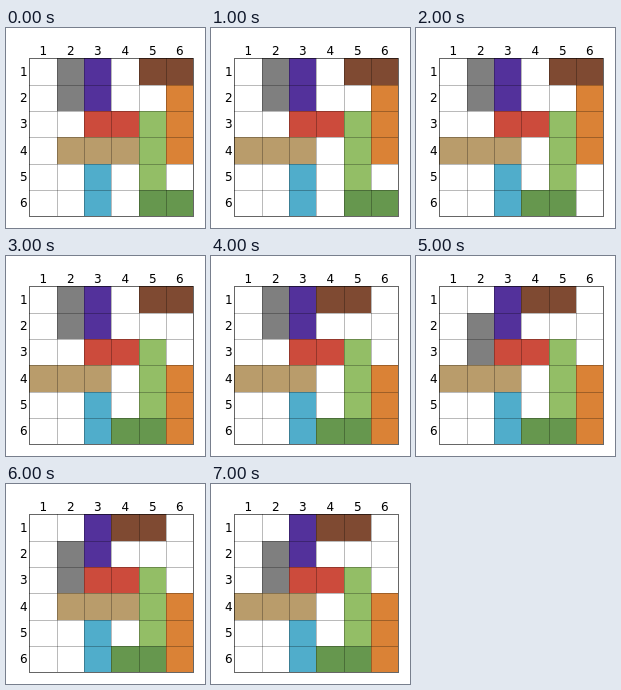
An HTML page with a canvas for the animation above (8 s loop, 199 by 200 pixels).

```html
<!DOCTYPE html>
<html>
<head>
<meta charset="utf-8">
<style>
html, body { margin: 0; width: 100%; height: 100%; overflow: hidden; background: #fff; }
canvas { display: block; }
</style>
</head>
<body>
<canvas id="board" width="199" height="200"></canvas>
<script>
const ctx = document.getElementById('board').getContext('2d');
const SIZE = 6, STEP_MS = 1000, LOOP_MS = 8000;
const xs = [23, 51, 78, 105, 133, 160, 187];
const ys = [30, 57, 83, 109, 136, 162, 188];

// color, column, row, width, height
const cars = {
  gray: ['#7f7f7f', 1, 0, 1, 2],
  purple: ['#53319b', 2, 0, 1, 2],
  brown: ['#7f4a32', 4, 0, 2, 1],
  red: ['#cc4b3c', 2, 2, 2, 1],
  orange: ['#da8236', 5, 1, 1, 3],
  lime: ['#93be66', 4, 2, 1, 3],
  tan: ['#b99c6b', 1, 3, 3, 1],
  blue: ['#50adcb', 2, 4, 1, 2],
  green: ['#66974e', 4, 5, 2, 1]
};

// one move per step: car, columns, rows
const moves = [
  ['tan', -1, 0], ['green', -1, 0], ['orange', 0, 2], ['brown', -1, 0],
  ['gray', 0, 1], ['tan', 1, 0], ['tan', -1, 0]
];

function drawCar(name, done) {
  let [color, col, row, w, h] = cars[name];
  for (const [car, dx, dy] of done) {
    if (car === name) { col += dx; row += dy; }
  }
  ctx.fillStyle = color;
  ctx.fillRect(xs[col], ys[row], xs[col + w] - xs[col], ys[row + h] - ys[row]);
}

function drawGrid() {
  const width = xs[SIZE] - xs[0], height = ys[SIZE] - ys[0];
  ctx.fillStyle = 'rgba(0, 0, 0, 0.27)';
  for (let i = 1; i < SIZE; i++) {
    ctx.fillRect(xs[i], ys[0], 1, height);
    ctx.fillRect(xs[0], ys[i], width, 1);
  }
  ctx.strokeStyle = 'rgba(0, 0, 0, 0.6)';
  ctx.strokeRect(xs[0] + 0.5, ys[0] + 0.5, width, height);
}

function drawLabels() {
  ctx.fillStyle = '#000';
  ctx.font = '12px "DejaVu Sans", sans-serif';
  ctx.textAlign = 'center';
  for (let i = 0; i < SIZE; i++) {
    ctx.fillText(i + 1, (xs[i] + xs[i + 1]) / 2 + 0.3, 27);
    ctx.fillText(i + 1, 17.9, Math.round((ys[i] + ys[i + 1]) / 2 + 4.4));
  }
}

function draw() {
  const step = Math.floor(performance.now() % LOOP_MS / STEP_MS);
  const done = moves.slice(0, step);
  ctx.fillStyle = '#fff';
  ctx.fillRect(0, 0, 199, 200);
  for (const name in cars) drawCar(name, done);
  drawGrid();
  drawLabels();
  requestAnimationFrame(draw);
}
draw();
</script>
</body>
</html>
```
